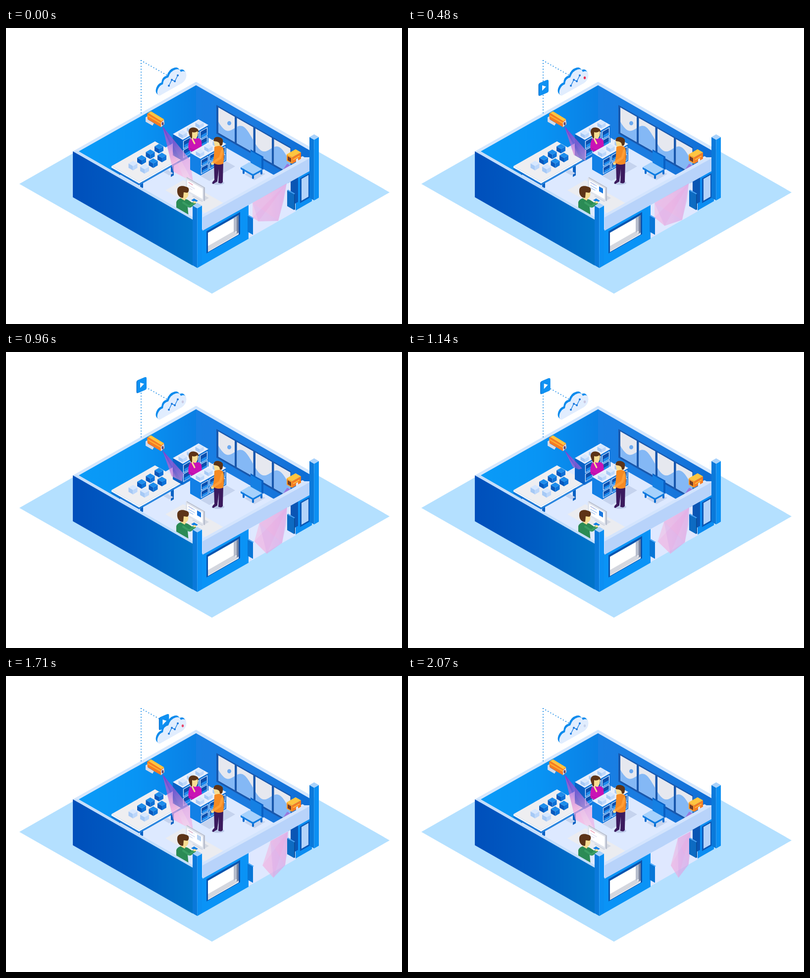
Animation, 800 px wide and 600 px high, one loop 2.1 s. Source, as an HTML page:

```html
<!DOCTYPE html>
<html lang="en">
<head>
<meta charset="utf-8">
<title>Smart shop</title>
<style>
html, body { margin: 0; width: 100%; height: 100%; overflow: hidden; background: #fff; }
svg { display: block; width: 800px; height: 600px; }
</style>
</head>
<body>
<svg id="stage" viewBox="0 0 800 600" xmlns="http://www.w3.org/2000/svg"></svg>
<script>
const LOOP = 2100, STEP = 30;
const K = .572; // slope of the isometric axes

const poly = (pts, fill, more = '') => `<polygon points="${pts}" fill="${fill}" ${more}/>`;
const path = (d, fill, more = '') => `<path d="${d}" fill="${fill}" ${more}/>`;
const line = (d, color, w) => path(d, 'none', `stroke="${color}" stroke-width="${w}" stroke-linecap="round"`);
const oval = (x, y, rx, ry, fill, more = '') => `<ellipse cx="${x}" cy="${y}" rx="${rx}" ry="${ry}" fill="${fill}" ${more}/>`;
const grad = (id, x1, x2, ...colors) =>
  `<linearGradient id="${id}" gradientUnits="userSpaceOnUse" x1="${x1}" y1="0" x2="${x2}" y2="0">` +
  colors.map((c, i) => `<stop offset="${i / (colors.length - 1)}" stop-color="${c}"/>`).join('') + '</linearGradient>';
const times = (n, f) => Array.from({ length: n }, (_, i) => f(i)).join('');

// Upright panels that fall or rise to the right, from their top left corner
const down = (x, y, w, h, fill, more) => poly([x, y, x + w, y + w * K, x + w, y + w * K + h, x, y + h], fill, more);
const up = (x, y, w, h, fill, more) => poly([x, y, x + w, y - w * K, x + w, y - w * K + h, x, y + h], fill, more);
// Level surface from its left corner: a runs right and up, b right and down
const flat = (x, y, a, b, fill) =>
  poly([x, y, x + a, y - a * K, x + a + b, y + (b - a) * K, x + b, y + b * K], fill);
const box = (x, y, a, b, h, [top, left, right]) =>
  down(x, y, b, h, left) + up(x + b, y + b * K, a, h, right) + flat(x, y, a, b, top);

const BLUE = ['#1d8dec', '#0759bd', '#0c72d8'];
const PALE = ['#d6e7ff', '#a6c9f6', '#bcd7fb'];
const SKIN = '#f8dd92', HAIR = '#5d3417', SHADE = '#c5d3ee';

const cube = (x, y, colors, s = 9, h = 9) => box(x - s, y, s, s, h, colors);

function room() {
  return flat(146, 343, 238, 222, '#dde9ff') +
    up(146, 250, 238, 93, 'url(#wallL)') + down(384, 115, 233, 93, 'url(#wallR)') +
    poly('135,250 384,109 617,243 617,250 384,116 147,250', '#d5e7fd');
}

function windows() {
  const pane = i => {
    const x = 429 + i * 37.5, y = 161 + i * 21.4, wave = [];
    for (let u = x; u <= x + 33; u += 3) {
      const foot = 212 + (u - 429) * K;
      wave.push(u, foot - 27 + 14 * Math.cos((u - 443) / 73 * 2 * Math.PI));
    }
    const foot = y + 51;
    return down(x, y, 33, 51, '#e6e8ef') + poly([...wave, x + 33, foot + 33 * K, x, foot], '#84b8f5');
  };
  return down(425, 156, 151, 58, '#1858ae') + times(4, pane) + oval(451, 193, 4, 4.3, '#6ca9f0');
}

function table() {
  const leg = (x, y, h) => up(x, y, 6, h, '#0b62c4');
  const cubes = times(7, i => {
    const row = i % 2, col = i >> 1;
    return cube(309 - col * 17.5 + row * 6, 240 + col * 11.5 + row * 18, col + row === 3 || i === 5 ? PALE : BLUE);
  });
  return leg(228, 291, 8) + leg(333, 275, 27) + leg(271, 312, 15) +
    flat(318, 292, 8, 12, SHADE) +
    box(213, 284, 88, 56, 3, ['#1473d4', '#1473d4', '#2383df']) +
    box(213, 280, 88, 56, 3, ['#eeeef1', '#fff', '#fff']) + cubes;
}

const bin = (x, y, w, h) => up(x, y, w, h, '#0a4fae', 'stroke="#d3e6ff" stroke-width="1.3"') +
  up(x + 2, y + h * .5, w - 3, h * .4, '#1e8aec');

function shelf(x, y, b, h, left, binH) {
  const bins = times(6, i => {
    const col = i >> 1, row = i % 2;
    return bin(x + b + 1.5 + col * 17, y + b * K + 3 - col * 9.7 + row * (binH + 3), 14, binH);
  });
  const goods = times(3, i => cube(x + 54 - i * 17, y - 23 + i * 10, PALE, 8.5, 7));
  return box(x, y, 52, b, h, ['#e8effc', left, '#1173d8']) + bins + goods;
}

function woman() {
  return path('M369 212 C368 201 379 199 386 204 C391 208 389 213 385 213 L382 226 C375 228 372 222 369 212 Z', HAIR) +
    path('M376 211 Q382 213 387 209 Q389 218 385 222 L383 228 L376 226 Z', SKIN) +
    path('M371 226 Q376 221 382 225 Q390 220 395 229 L396 246 L383 255 L369 247 Q367 235 371 226 Z', '#c913b5') +
    line('M376 224 L381 234', SKIN, 3) + line('M371 244 L383 249', '#a60d9e', 1);
}

function shopper() {
  return oval(428, 314, 13, 4, '#bccae8') +
    path('M420 271 H439 L438 309 Q439 314 434 315 L429 314 L430 285 L427 311 L419 316 Q415 316 418 311 L421 308 Z', '#3b1a5d') +
    path('M420 232 Q421 224 429 223 Q436 225 434 238 L430 244 L422 241 Z', SKIN) +
    path('M419 229 Q420 219 430 221 Q440 223 438 232 Q437 241 432 238 Q432 231 425 230 Z', HAIR) +
    path('M421 241 Q433 236 439 243 Q442 257 439 275 Q428 280 418 273 L420 259 Z', '#f58a23') +
    line('M437 248 L433 263 L417 274', '#ff9e35', 5) + oval(417, 275, 3, 2.5, SKIN);
}

function chair() {
  return flat(482, 297, 22, 20, SHADE) +
    line('M480 286V294 M499 296V304 M516 288V295', '#0b6cd0', 4) +
    down(494, 246, 26, 27, '#0860c4') + down(494, 249, 22, 25, '#1580e3') +
    box(474, 282, 18, 25, 4, ['#a5d1fc', '#0f7de2', '#0f7de2']);
}

function desk() {
  return flat(322, 329, 36, 90, '#ebecf0') + flat(376, 341, 14, 20, '#d4d8e2') +
    down(365, 302, 37, 28, '#b9bfce') + down(363, 303, 36, 28, '#dfe3ec') + down(366, 308, 31, 21, '#fff') +
    line('M369 313 L377 318', '#e889a5', 1.2) + line('M369 319 L381 326 M369 324 L376 328', '#d6daf0', 1.2) +
    '<g id="report">' + down(386, 321, 8, 10, '#1b79df') +
    line('M369 313 L381 320 M369 319 L381 326 M369 324 L378 329', '#9fc6f7', 1.3) + '</g>';
}

function clerk() {
  return flat(374, 349, 6, 8, '#1380e5') +
    path('M344 382 L344 353 Q347 345 356 345 L367 348 L376 354 L381 351 L384 356 L373 364 L367 362 L369 384 Z', '#2b8b55') +
    line('M358 354 L370 362 L380 354', '#399d63', 4) + oval(381, 353, 2.8, 2.3, SKIN) +
    path('M355 332 H368 Q370 341 364 345 L361 350 L354 346 Z', SKIN) +
    path('M346 329 C346 319 358 319 364 322 C372 323 370 333 366 334 L359 333 L358 344 C350 346 345 336 346 329 Z', HAIR);
}

function roomCamera() {
  return poly('282,181 287,178 287,186 299,193 296,198 282,190', '#d5dbe8') +
    poly('285,174 293,169 319,185 320,195 313,201 286,185', '#f47b25') +
    poly('287,172 293,169 319,185 314,189', '#ffc540') + down(286, 176, 27, 3, '#ffad2f') +
    poly('313,192 319,186 320,195 313,201', '#d7dbe7') + oval(316.5, 194, 2, 3.3, '#61486f');
}

function doorCamera() {
  return flat(583, 269, 16, 6, '#dce8fc') +
    box(567, 256, 18, 11, 13, ['#ffc540', '#ff9a26', '#f47b25']) +
    down(569, 260, 7, 8, '#723d2b') + up(580, 266, 13, 2, '#ffc540') + up(586, 266, 4, 11, '#e3e8f2');
}

function outerWalls() {
  return poly('135,250 147,250 377,383 377,391', '#c4defb') + down(135, 250, 242, 93, 'url(#outer)') +
    up(396, 409, 94, 72, '#0a93f6') + up(490, 360, 95, 66, '#dfe8ff') +
    up(585, 304, 33, 66, '#0b8df2') + up(575, 311, 15, 50, '#0a55b4') +
    poly('397,379 606,262 617,262 617,288 397,411', '#b8d3fa') +
    poly('397,378 604,262 617,262 397,384', '#d3e4fd') +
    // display window
    up(405, 412, 68, 45, '#0b54ae') + up(408, 415, 62, 39, '#fff') +
    poly('408,442 460,412 470,417 408,453', '#d4d7df') +
    up(460, 385, 6, 30, '#b7bdcc') + up(466, 382, 4, 35, '#77839f') +
    // side window and left door leaf
    up(594, 305, 19, 50, '#0a57b5') + up(597, 306, 14, 44, '#b3d3fa') +
    down(488, 380, 11, 33, '#0876d7') + flat(488, 380, 2, 11, '#48a7fa');
}

function posts() {
  const post = (x, y, h) => box(x, y, 9.5, 9.5, h, ['#a9d2fb', '#0a79da', '#0b8ff3']);
  return box(568, 329, 2, 14, 32, ['#4aa3f2', '#0d6bc2', '#084f9d']) + post(613, 221, 123) + post(377, 360, 121);
}

function dots(x1, y1, x2, y2) {
  const n = Math.round(Math.hypot(x2 - x1, y2 - y1) / 5.9);
  return times(n + 1, i => oval(x1 + (x2 - x1) * i / n, y1 + (y2 - y1) * i / n, 1.05, 1.05, '#1689e6'));
}

function playIcon() {
  const tile = 'M-9 -6 Q-9 -9 -6 -10.5 L7 -16 Q10 -17 10 -13 V6 Q10 8 8 9.5 L-6 15.5 Q-9 17 -9 13 Z';
  return '<g id="icon">' + path(tile, '#0870cf', 'transform="translate(-1.5 .5)"') + path(tile, '#0f91f2') +
    poly('-3,-5 5,-2.5 -3,6', '#f5faff') + '</g>';
}

function cloud() {
  const shape = 'M311 137 C305 138 304 129 308 122 Q311 116 317 114 Q318 102 328 100 Q332 87 343 84 Q351 82 353 89 Q364 84 364.5 96 Q364 106 355 112 Z';
  const graph = [[329, 117], [335, 105], [341, 108], [347, 96]];
  return times(3, i => path(shape, '#0d8bed', `transform="translate(${i - 3} ${(i - 3) * 1.2})"`)) + path(shape, '#e1edfe') +
    line('M' + graph.join('L'), '#2384e4', 1.4) + graph.map(([x, y]) => oval(x, y, 2, 2, '#1778df')).join('') +
    oval(357, 101, 2.2, 2.7, '#c7d4ec', 'id="idle"') + oval(357, 101, 2.2, 2.7, '#ee2850', 'id="alert"');
}

const stage = document.getElementById('stage');
stage.innerHTML = '<defs>' +
  grad('wallL', 146, 384, '#0a9bf8', '#0894f4', '#0a7fe4') +
  grad('wallR', 384, 606, '#177fe4', '#1c7bdf', '#0e6ed6') +
  grad('outer', 135, 377, '#004fbb', '#005dc3', '#0074c9') +
  grad('doorGlow', 500, 568, '#f2bde3', '#efb5e0', '#dba8e6') +
  '<radialGradient id="glow" gradientUnits="userSpaceOnUse" cx="316" cy="199" r="110">' +
  '<stop offset="0" stop-color="#7a2cc4" stop-opacity=".9"/><stop offset=".4" stop-color="#a455cf" stop-opacity=".6"/>' +
  '<stop offset=".7" stop-color="#f0a0d8" stop-opacity=".6"/><stop offset="1" stop-color="#ffb8de" stop-opacity=".55"/></radialGradient></defs>' +
  flat(27, 316, 359, 389, '#b4e0ff') + room() + windows() + table() + shelf(337, 215, 20, 43, '#0a61c7', 15) +
  '<g id="beam"></g>' + woman() + flat(393, 300, 52, 18, SHADE) + shelf(372, 253, 21, 34, '#1280e6', 12) +
  shopper() + chair() + desk() + clerk() + roomCamera() +
  poly('568,275 575,279 572,291 548,304', '#a25bd2', 'opacity=".7"') + doorCamera() +
  outerWalls() + '<g id="doorBeam"></g>' + posts() +
  dots(273, 66, 273, 172) + dots(273, 66, 324, 95) + playIcon() + cloud();

const mix = (a, b, u) => a + (b - a) * u;
const ramp = (t, from, to) => Math.min(1, Math.max(0, (t - from) / (to - from)));

// How far the room beam reaches: [time, reach]
const REACH = [[0, 1], [480, .42], [750, .7], [1140, 0], [1410, .8], [1710, 1], [LOOP, 1]];
function reach(t) {
  const i = REACH.findIndex(k => k[0] > t), [t0, a] = REACH[i - 1], [t1, b] = REACH[i];
  return mix(a, b, ramp(t, t0, t1));
}

function roomBeam(t) {
  const r = reach(t), eye = [316, 199];
  const a = [mix(333, 338, r), mix(233, 291, r)];
  const b = [mix(345, 378, r), mix(238, 313, r)];
  const c = [mix(352, 372, r), mix(236, 267, r)];
  return poly([eye, a, b, c], 'url(#glow)') +
    poly([eye, a, [mix(a[0], b[0], .5), mix(a[1], b[1], .5)]], '#ff9edb', 'opacity=".2"') +
    poly([eye, b, c], '#c07be8', 'opacity=".15"');
}

// The door beam narrows as its left side swings towards the hinge
function doorBeam(t) {
  const p = t / LOOP, q = ramp(t, 500, LOOP), x = 498 + 48 * q;
  const top = [567 + 4 * p * p, 315], left = [x, 355 - (x - 497) * .54];
  const low = [498 + 34 * ramp(t, 400, LOOP) ** 2, 384], tip = [510 + 37 * p, 392 + 17 * ramp(t, 0, 900)];
  const right = [550 + 17 * p, 391 - 9 * p], edge = [561 + 10 * p, 350];
  return poly([top, left, low, tip, right, edge], 'url(#doorGlow)', 'opacity=".6"') +
    poly([top, low, tip], '#f09ad9', 'opacity=".2"') +
    poly([top, left, right], '#e789d3', 'opacity=".2"') +
    poly([left, tip, right], '#c693e5', 'opacity=".2"');
}

const el = id => document.getElementById(id);
const fade = (id, o) => el(id).setAttribute('opacity', o);

function draw(t) {
  el('beam').innerHTML = roomBeam(t);
  el('doorBeam').innerHTML = doorBeam(t);

  // The clip eases up from the camera, then slides down into the cloud
  const rise = ramp(t, 290, 965), slide = ramp(t, 1090, 1910) * 60;
  el('icon').setAttribute('transform', `translate(${274 + slide} ${67 + 105 * (1 - rise) ** 2 + slide * .577})`);
  fade('icon', ramp(t, 290, 360) * (1 - ramp(t, 1880, 1940)));

  fade('idle', ramp(t, 0, 300));
  fade('alert', Math.sin(t / LOOP * 2 * Math.PI) ** 2);
  fade('report', ramp(t, 240, 390) * (1 - ramp(t, 1530, 1800)));
}

const start = performance.now();
function tick() {
  const t = Math.max(0, performance.now() - start) % LOOP;
  draw(Math.floor(t / STEP) * STEP);
  requestAnimationFrame(tick);
}
tick();
</script>
</body>
</html>
```
